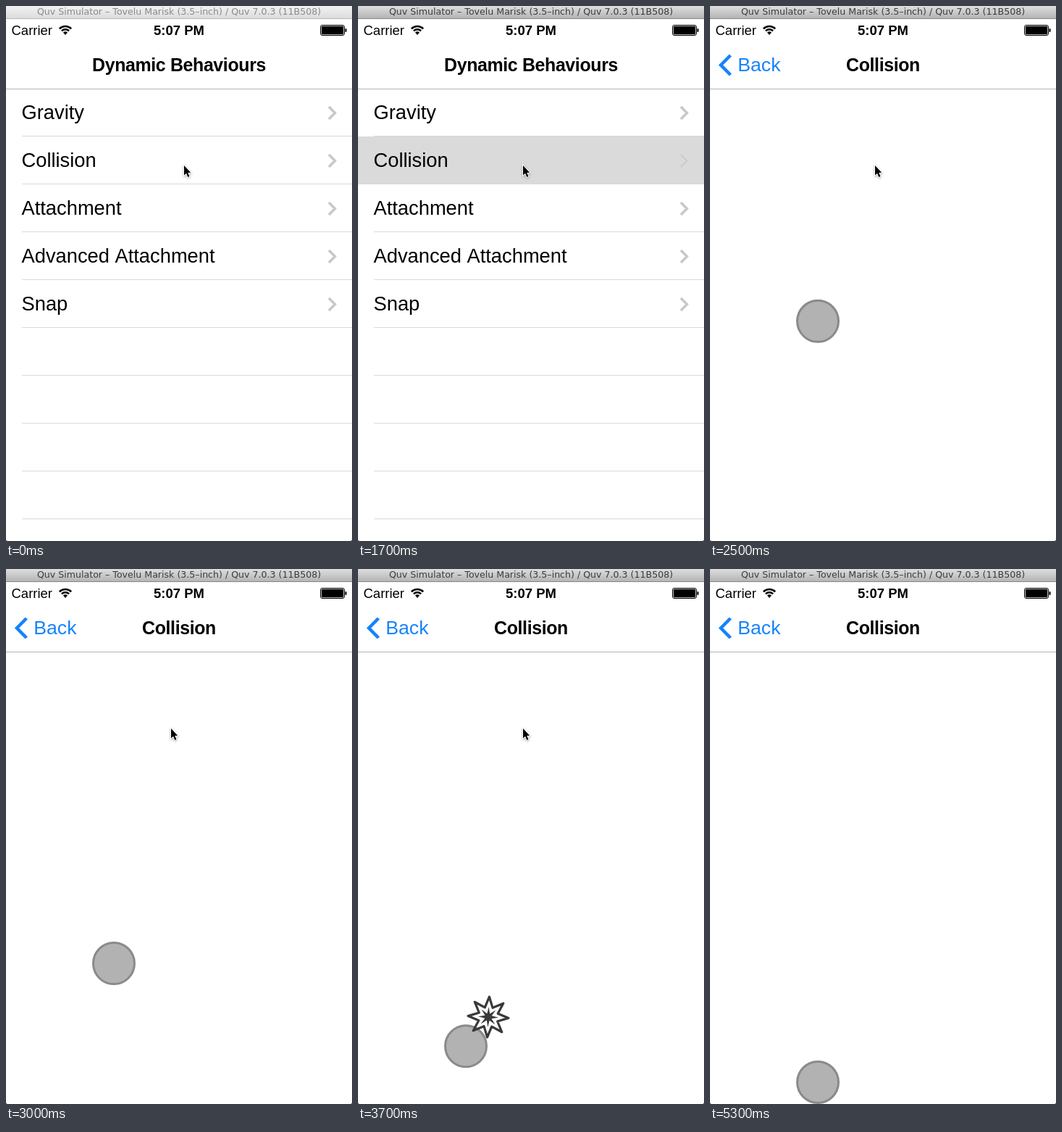
An HTML page with a canvas that plays this animation: 478 px wide and 738 px high, repeating every 6000 ms.

```html
<!DOCTYPE html>
<html lang="en">
<head>
<meta charset="utf-8">
<title>Dynamic Behaviours</title>
<style>
html, body { margin: 0; width: 100%; height: 100%; overflow: hidden; background: #fff; }
canvas { display: block; }
</style>
</head>
<body>
<canvas id="stage" width="478" height="738"></canvas>
<script>
const W = 478, H = 738, LOOP = 6000, TICK = 100;
const c = document.getElementById('stage').getContext('2d');
const SANS = '"Liberation Sans", Arial, sans-serif';
const BLUE = '#1683fb';
const ROWS = ['Gravity', 'Collision', 'Attachment', 'Advanced Attachment', 'Snap'];
const WINDOW_TITLE = 'Quv Simulator – Tovelu Marisk (3.5–inch) / Quv 7.0.3 (11B508)';

const clamp = v => Math.max(0, Math.min(1, v));

function text(str, x, y, font, color = '#000', align = 'left', spacing = 0) {
  c.font = font;
  c.fillStyle = color;
  c.textAlign = align;
  c.letterSpacing = spacing + 'px';
  c.fillText(str, x, y);
}

function rect(x, y, w, h, color) {
  c.fillStyle = color;
  c.fillRect(x, y, w, h);
}

function trace(points, closed) {
  c.beginPath();
  points.forEach(([x, y]) => c.lineTo(x, y));
  if (closed) c.closePath();
}

function line(points, color, width) {
  trace(points);
  c.strokeStyle = color;
  c.lineWidth = width;
  c.stroke();
}

function layer(dx, alpha, draw) {
  c.save();
  c.translate(dx, 0);
  c.globalAlpha = alpha;
  draw();
  c.restore();
}

function titleBar(active) {
  const g = c.createLinearGradient(0, 0, 0, 17);
  g.addColorStop(0, active ? '#dedede' : '#f2f2f2');
  g.addColorStop(1, active ? '#b4b4b4' : '#dcdcdc');
  rect(0, 0, W, 17, g);
  rect(0, 17, W, 1, active ? '#8a8a8a' : '#b8b8b8');
  text(WINDOW_TITLE, W / 2, 12, '12.6px "DejaVu Sans", sans-serif', active ? '#3c3c3c' : '#8a8a8a', 'center');
}

function statusBar() {
  text('Carrier', 7.5, 40, '18.5px ' + SANS);
  text('5:07 PM', 239, 40, 'bold 18.5px ' + SANS, '#000', 'center');

  // wifi
  const a = Math.PI / 4, top = -Math.PI / 2;
  c.strokeStyle = c.fillStyle = '#000';
  c.lineWidth = 2.6;
  for (const r of [11.5, 7.2]) {
    c.beginPath();
    c.arc(82, 39.5, r, top - a, top + a);
    c.stroke();
  }
  c.beginPath();
  c.moveTo(82, 40);
  c.arc(82, 39.5, 4.2, top - a, top + a);
  c.fill();

  // battery
  c.lineWidth = 1;
  c.beginPath();
  c.roundRect(434.5, 26.5, 33, 14, 2.5);
  c.stroke();
  c.beginPath();
  c.roundRect(435.8, 27.8, 30.4, 11.4, 1);
  c.fill();
  c.beginPath();
  c.roundRect(468.5, 31, 2, 5, 1);
  c.fill();
}

function navTitle(str) {
  text(str, 239, 90, 'bold 24.9px ' + SANS, '#000', 'center', -0.35);
}

function list(selected) {
  rect(0, 115, W, H - 115, '#fff');
  for (let y = 179; y < H; y += 66) rect(22, y, W - 22, 1, '#d9d9db');
  if (selected >= 0) rect(0, 180 + 66 * (selected - 1), W, 66, '#dadada');
  ROWS.forEach((name, i) => {
    const y = 147.5 + 66 * i;
    text(name, 21.5, y + 8.5, '27.3px ' + SANS);
    line([[446, y - 8.5], [454.5, y], [446, y + 8.5]], i === selected ? '#c9c9cb' : '#c7c7cc', i === selected ? 1.8 : 3.4);
  });
}

// Free fall, then bounces that lose energy until the ball rests on the floor.
function ballY(t) {
  const g = 1494, floor = 708;
  let hit = 2.714;
  if (t < hit) return 18 + g / 2 * Math.max(0, t - 1.753) ** 2;
  let bounce = 0.548, speed = 1436 * bounce;
  while (speed > 70) {
    const span = 2 * speed / g, s = t - hit;
    if (s < span) return floor - speed * s + g / 2 * s * s;
    hit += span;
    bounce *= 0.981;
    speed *= bounce;
  }
  return floor;
}

function ball(y) {
  c.beginPath();
  c.arc(149, y, 28.5, 0, 2 * Math.PI);
  c.fillStyle = '#b2b2b2';
  c.fill();
  c.strokeStyle = '#8a8a8a';
  c.lineWidth = 3;
  c.stroke();
}

function star(x, y, outer, inner) {
  const points = [];
  for (let i = 0; i < 16; i++) {
    const r = i % 2 ? inner : outer, a = i * Math.PI / 8 - Math.PI / 2 + 0.05;
    points.push([x + r * Math.cos(a), y + r * Math.sin(a)]);
  }
  trace(points, true);
}

function burst(x, y) {
  c.strokeStyle = c.fillStyle = '#3a3a3a';
  c.lineWidth = 3.2;
  c.lineJoin = 'round';
  star(x, y, 28, 14);
  c.stroke();
  star(x, y, 14, 5);
  c.fill();
  c.lineJoin = 'miter';
}

function scene(t) {
  rect(0, 115, W, H - 115, '#fff');
  ball(ballY(t));
  if ([2.7, 3.7, 4.4].some(s => t >= s - 0.001 && t < s + 0.199)) burst(180, 618);
}

function backButton(p) {
  layer(0, p, () => line([[28.3, 68], [15, 81.5], [28.3, 95]], BLUE, 4.6));
  layer(140 * (1 - p), p, () => text('Back', 38.2, 90, '26.7px ' + SANS, BLUE));
}

function cursor(x, y) {
  const shape = [[0, 0], [0, 13.4], [3, 10.7], [5.3, 16], [7.5, 15], [5.3, 9.9], [9.2, 9.7]];
  c.save();
  c.translate(x, y);
  trace(shape, true);
  c.shadowColor = 'rgba(0,0,0,.35)';
  c.shadowBlur = 3;
  c.shadowOffsetY = 1;
  c.strokeStyle = '#fff';
  c.lineWidth = 2;
  c.stroke();
  c.shadowColor = 'transparent';
  c.fillStyle = '#000';
  c.fill();
  c.restore();
}

function pushAmount(t) {
  if (t < 2.05) return 0;
  if (t >= 2.5) return 1;
  const s = 18 * (t - 2.05);
  return 1 - (1 + s) * Math.exp(-s);
}

function draw(ms) {
  const t = ms / 1000, p = pushAmount(t);
  rect(0, 0, W, H, '#fff');

  if (p < 1) layer(-0.3 * W * p, 1, () => list(ms >= 1500 ? 1 : -1));
  if (p > 0) {
    if (p < 1) rect(0, 115, W, H - 115, `rgba(0,0,0,${0.1 * p})`);
    layer(W * (1 - p), 1, () => scene(t));
  }

  rect(0, 18, W, 96, '#fff');
  rect(0, 114, W, 1, '#b4b4b6');
  statusBar();
  if (p < 1) layer(-150 * p, 1 - p, () => navTitle('Dynamic Behaviours'));
  if (p > 0) {
    layer(200 * (1 - p), p, () => navTitle('Collision'));
    backButton(p);
  }

  titleBar(ms >= 1400);
  rect(0, H - 1, 1, 1, '#222');
  rect(W - 1, H - 1, 1, 1, '#222');

  // the pointer glides to the tapped row and finally leaves over the top edge
  const leave = clamp((t - 4.9) / 0.4);
  cursor(246 - 18 * clamp(t / 0.3), 220 - 250 * leave * leave);
}

const start = performance.now();
function loop() {
  const ms = (performance.now() - start) % LOOP;
  draw(Math.floor(ms / TICK) * TICK);
  requestAnimationFrame(loop);
}
loop();
</script>
</body>
</html>
```
